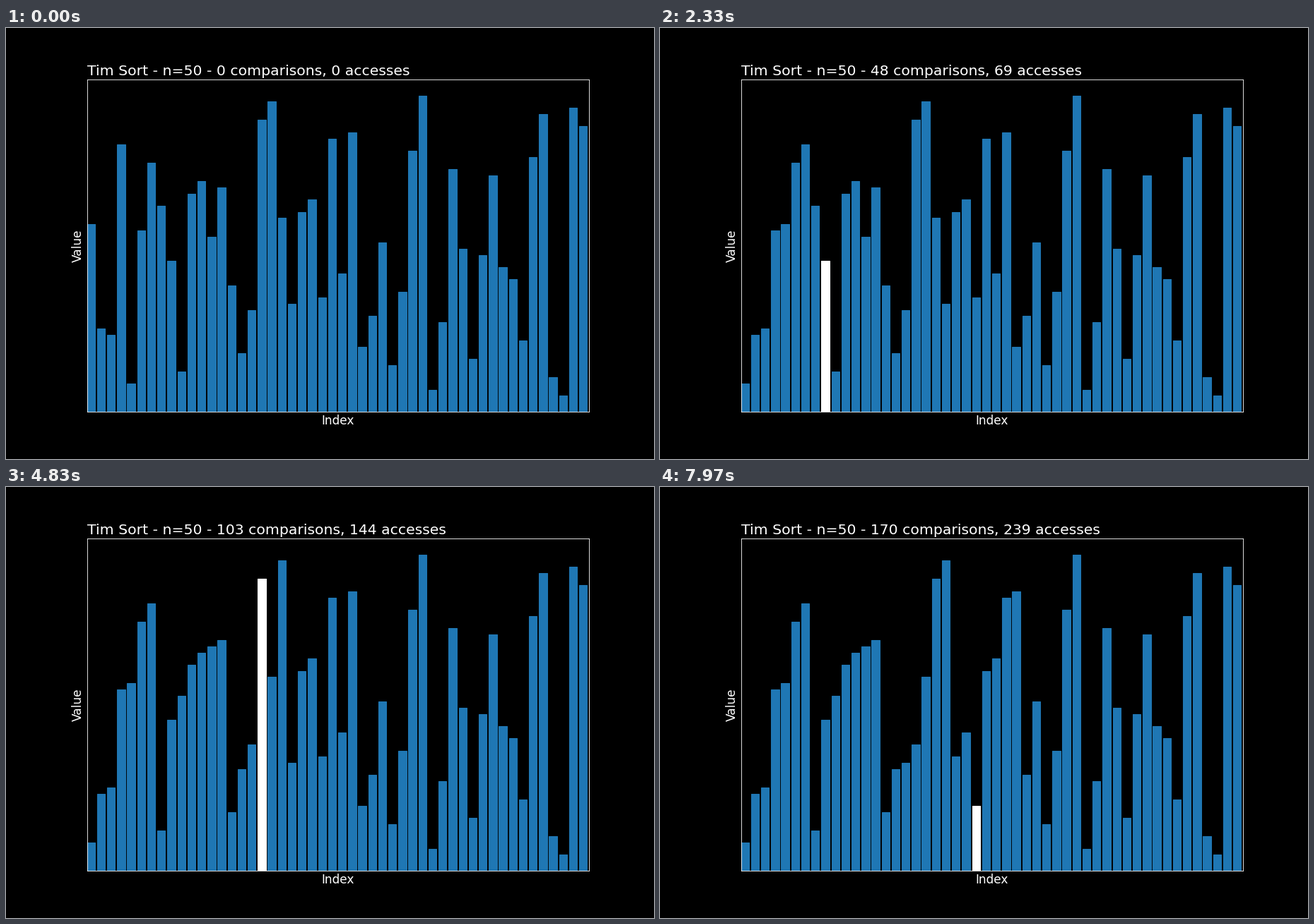
These frames come from a looping animation (917x611 px, 8 s). A matplotlib script:

```python
import numpy as np
import matplotlib.pyplot as plt
from matplotlib.animation import FuncAnimation

W, H, DPI = 917, 611, 64
K = W / 12 / DPI  # type and line scale
N, RUN, FRAMES = 50, 7, 240
BLUE = "#1f77b4"
MARK = {"get": "white", "set": "red"}

plt.style.use("dark_background")
plt.rcParams.update({
    "font.family": "DejaVu Sans",
    "font.size": 16 * K,
    "axes.titlepad": 6 * K,
    "axes.labelpad": 4 * K,
    "axes.linewidth": 0.8 * K,
})


class Tracked:
    """List that logs every read and write with a copy of its state."""

    def __init__(self, values):
        self.values = list(values)
        self.log = [(None, None, list(values))]

    def track(self, op, i):
        self.log.append((op, i, list(self.values)))

    def __getitem__(self, i):
        self.track("get", i)
        return self.values[i]

    def __setitem__(self, i, value):
        self.values[i] = value
        self.track("set", i)


def insertion_sort(arr, left, right):
    for i in range(left + 1, right):
        j = i
        while j > left and arr[j] < arr[j - 1]:
            held = arr[j]
            arr[j] = arr[j - 1]
            arr[j - 1] = held
            j -= 1


order = np.random.RandomState(0).permutation(N)
arr = Tracked(np.linspace(50, 1000, N)[order])
for start in range(0, N, RUN):
    insertion_sort(arr, start, min(start + RUN, N))

# Reads made before each step
reads = np.cumsum([0] + [op == "get" for op, _, _ in arr.log])

fig, ax = plt.subplots(figsize=(W / DPI, H / DPI), dpi=DPI)
bars = ax.bar(range(N), arr.log[0][2], width=0.8, align="edge",
              color=BLUE, edgecolor=BLUE, linewidth=K)
ax.set(xlim=(0, N), ylim=(0, 1050), xticks=[], yticks=[],
       xlabel="Index", ylabel="Value")
title = ax.set_title("", loc="left")


def update(step):
    op, index, values = arr.log[step]
    for i, (bar, value) in enumerate(zip(bars, values)):
        bar.set_height(value)
        bar.set_color(MARK[op] if i == index else BLUE)
    title.set_text(f"Tim Sort - n={N} - {reads[step]} comparisons, "
                   f"{step} accesses")
    return [*bars, title]


anim = FuncAnimation(fig, update, frames=FRAMES, interval=8000 / FRAMES,
                     init_func=lambda: update(0), repeat=True, repeat_delay=0)
plt.show()
```
